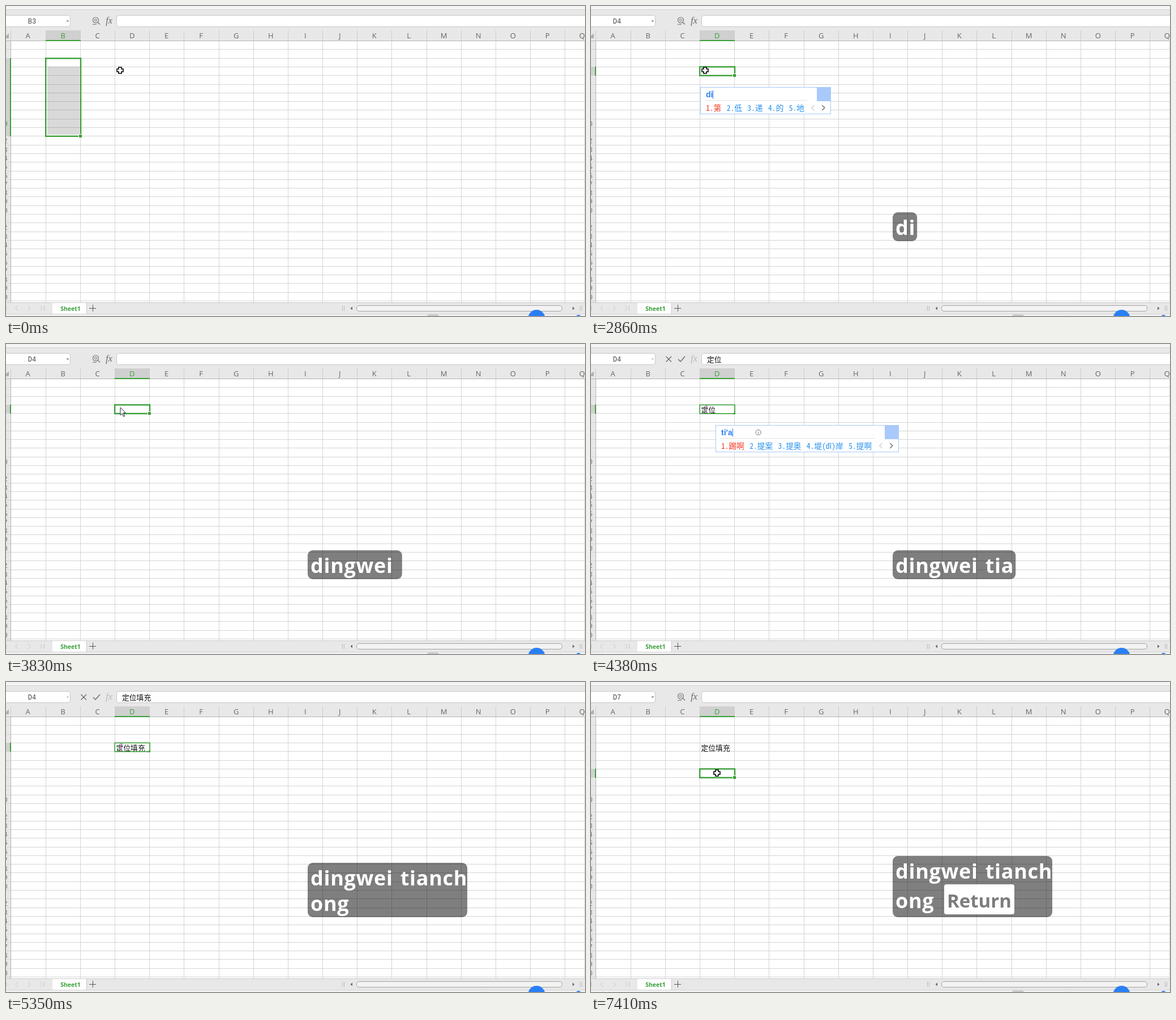
These frames come from a looping animation (1023x547 px, 8 s). An HTML page with a canvas:

```html
<!DOCTYPE html>
<html lang="zh">
<head>
<meta charset="utf-8">
<style>
html, body { margin: 0; width: 100%; height: 100%; overflow: hidden; background: #fff; }
canvas { display: block; }
</style>
</head>
<body>
<canvas id="stage" width="1023" height="547"></canvas>
<script>
const ctx = document.getElementById('stage').getContext('2d');
const LOOP = 8000, GREEN = '#3a9f38', BLUE = '#2b7ff5', PANEL = '#e8e8e8';
const UI = '"Open Sans", "Noto Sans", sans-serif';
const CJK = '"Noto Sans Mono CJK SC", "Noto Sans CJK SC", "Noto Sans CJK", sans-serif';

// [start, keystroke overlay]
const overlays = [
  [0, ''], [2860, 'di'], [3010, 'ding'], [3160, 'dingw'], [3280, 'dingwe'], [3400, 'dingwei'],
  [3830, 'dingwei '], [4230, 'dingwei ti'], [4380, 'dingwei tia'], [4530, 'dingwei tian'],
  [4650, 'dingwei tianch'], [4800, 'dingwei tianch\no'], [4920, 'dingwei tianch\nong'],
  [5600, 'dingwei tianch\nong\t']
];
// [start, pinyin, candidates, info icon x]
const dingwei = '定位 定为 订位 定 顶', tianchong = '填充 天虫 添宠 天冲 填充色';
const inputs = [
  [0], [2860, 'di', '第 低 递 的 地'], [3010, 'ding', '定 顶 订 盯 钉'],
  [3160, "ding'w", dingwei, 296], [3280, "ding'we", dingwei, 296], [3400, "ding'wei", dingwei, 296],
  [3550, "ding'wei", dingwei, 358], [3830],
  [4230, 'ti', '题 提 体 替 踢'], [4380, "ti'a", '踢啊 提案 提奥 堤(dī)岸 提啊', 295.5],
  [4530, 'tian', '天 填 田 添 甜'], [4650, "tian'ch", tianchong, 334],
  [4800, "tian'cho", tianchong, 343], [4920, "tian'chong", tianchong, 365],
  [5070, "tian'chong", tianchong, 446], [5350]
];
// [start, column, first row, last row]
const selections = [[0, 1, 2, 10], [420, 3, 3, 3], [5600, 3, 4, 4], [7410, 3, 6, 6]];
// [start, shape, x, y]
const pointers = [
  [0, 'cross', 201.5, 113.5], [3830, 'arrow', 202, 112], [3950, 'beam', 204, 115],
  [5750, 'cross', 201.5, 113.5], [6550, 'cross', 218.5, 106.5], [6830, 'cross', 219.5, 137.5],
  [6980, 'cross', 222.5, 147.5], [7130, 'cross', 222.5, 160.5]
];
const names = [[0, 'B3'], [420, 'D4'], [5750, 'D5'], [7410, 'D7']];

const current = (list, t) => list.filter(item => item[0] <= t).pop();
const colX = i => Math.floor(8.94 + 61.18 * i);
const rowY = i => Math.floor(61.58 + 15.3 * i);

function rect(x, y, w, h, color) {
  ctx.fillStyle = color;
  ctx.fillRect(x, y, w, h);
}
function rounded(x, y, w, h, r, fill, stroke) {
  ctx.beginPath();
  ctx.roundRect(x, y, w, h, r);
  paint(fill, stroke);
}
function paint(fill, stroke, width = 1) {
  ctx.lineWidth = width;
  if (fill) { ctx.fillStyle = fill; ctx.fill(); }
  if (stroke) { ctx.strokeStyle = stroke; ctx.stroke(); }
}
function poly(points, stroke, width = 1, fill) {
  ctx.beginPath();
  for (let i = 0; i < points.length; i += 2) ctx.lineTo(points[i], points[i + 1]);
  if (fill) ctx.closePath();
  paint(fill, stroke, width);
}
function circle(x, y, r, fill, stroke, width) {
  ctx.beginPath();
  ctx.arc(x, y, r, 0, 7);
  paint(fill, stroke, width);
}
function text(str, x, y, font, color, align = 'left') {
  ctx.font = font;
  ctx.fillStyle = color;
  ctx.textAlign = align;
  ctx.fillText(str, x, y);
  return ctx.measureText(str).width;
}
const chevron = (x, y, dir, size, color, width) =>
  poly([x - dir * size / 2, y - size, x + dir * size / 2, y, x - dir * size / 2, y + size], color, width);

function drawToolbar(t, editing) {
  rect(0, 0, 1023, 62, PANEL);
  rect(0, 0, 1023, 6, '#f4f4f4');
  rect(0, 6, 1023, 1, '#d2d2d2');
  rounded(-8, 16.5, 121.5, 20, 4, '#fff', '#c6c6c6');
  rounded(195.5, 16.5, 840, 20, 4, '#fff', '#c6c6c6');
  text(current(names, t)[1], 46, 31, '12px "Liberation Mono", monospace', '#444', 'center');
  poly([106.5, 25.5, 111.5, 25.5, 109, 28.5], null, 1, editing ? '#c4c4c4' : '#888');
  if (editing) {
    poly([132.5, 22, 142, 31.5], '#666', 1.3);
    poly([142, 22, 132.5, 31.5], '#666', 1.3);
    poly([154, 27, 158, 31, 166, 22], '#666', 1.4);
    text('定位' + (t >= 5350 ? '填充' : ''), 205, 31.5, '300 12.8px ' + CJK, '#111');
  } else {
    circle(158.5, 25, 5, null, '#777', 1.2);
    circle(158.5, 25, 2, null, '#777', 1);
    poly([162, 28.5, 166, 32.5], '#777', 1.5);
    poly([153, 32.5, 160, 32.5], '#777', 1);
  }
  text('fx', 182, 31, 'italic 16px "Liberation Serif", serif', editing ? '#b8b8b8' : '#666', 'center');
}

function drawSheet([, col, first, last]) {
  const left = colX(col), right = colX(col + 1), top = rowY(first), bottom = rowY(last + 1);
  rect(0, 62, 9, 462, PANEL);
  rect(left, 43, right - left, 19, '#d0d0d0');
  rect(0, top, 9, bottom - top, '#d0d0d0');
  if (last > first) rect(left + 3, rowY(first + 1), right - left - 4, bottom - rowY(first + 1) - 2, '#d9d9d9');
  for (let i = 1; i <= 30; i++) rect(0, rowY(i), 1023, 1, '#d4d4d4');
  for (let i = 0; i < 17; i++) {
    rect(colX(i), 62, 1, 462, '#d4d4d4');
    rect(colX(i), 43, 1, 18, '#cdcdcd');
    text(String.fromCharCode(65 + i), colX(i) + 30.7, 57, '13px ' + UI, i === col ? GREEN : '#666', 'center');
  }
  rect(1022, 62, 1, 462, '#d4d4d4');
  for (let i = first + 1; i <= last; i++) rect(left + 3, rowY(i), right - left - 4, 1, '#bababa');
  for (let i = 0; i < 30; i++) {
    text(i + 1, -4.7, rowY(i) + 12.5, '13px ' + UI, i >= first && i <= last ? GREEN : '#777', 'center');
  }
  rect(0, 61, 1023, 1, '#b4b4b4');
  rect(8, 62, 1, 462, '#b4b4b4');
  poly([5, 48, 5, 57, -4, 57], null, 1, '#b0b0b0');
  rect(left, 60, right - left + 1, 2, GREEN);
  rect(7, top, 2, bottom - top + 1, GREEN);
}

function drawSelection([, col, first, last], editing) {
  const x = colX(col), y = rowY(first), w = colX(col + 1) - x, h = rowY(last + 1) - y;
  ctx.lineWidth = editing ? 1.6 : 2.4;
  ctx.strokeStyle = GREEN;
  ctx.strokeRect(x + .2, y + .4, w + .8, h + .4);
  if (editing) {
    poly([x + w + 2, y + h - 3, x + w + 2, y + h + 2, x + w - 3, y + h + 2], null, 1, GREEN);
  } else {
    rect(x + w - 3, y + h - 3, 6, 6, '#fff');
    rect(x + w - 2, y + h - 2, 5, 5, GREEN);
  }
}

function drawFooter(editing) {
  rect(0, 523, 1023, 24, PANEL);
  rect(0, 523, 1023, 1, '#c8c8c8');
  rect(0, 543, 1023, 1, '#d2d2d2');
  rect(0, 544, 1023, 3, '#f2f2f2');
  rect(82, 524, 60, 19, '#fff');
  rect(142, 524, 1, 19, '#c8c8c8');
  text('Sheet1', 114, 538, 'bold 10.5px ' + UI, GREEN, 'center');
  rect(0, 529, 1, 9, '#c4c4c4');
  chevron(19, 533.5, -1, 4.5, '#c4c4c4');
  chevron(41, 533.5, 1, 4.5, '#c4c4c4');
  chevron(62, 533.5, 1, 4.5, '#c4c4c4');
  rect(67, 529, 1, 9, '#c4c4c4');
  rect(147, 533, 12, 1, '#555');
  rect(153, 527, 1, 12, '#555');
  for (const x of [594, 597, 1014, 1017]) rect(x, 529, 1, 9, '#bbb');
  rounded(619.5, 528.5, 363, 10, 4.5, '#f3f3f3', '#a2a2a2');
  poly([612, 530.5, 612, 536.5, 608.5, 533.5], null, 1, '#666');
  poly([1001, 530.5, 1001, 536.5, 1004.5, 533.5], null, 1, '#666');
  if (!editing) rounded(744, 544.5, 21, 8, 3, '#c6c6c6');
  rect(20, 546, 1, 1, '#bbb');
  rect(844, 546, 1, 1, '#bbb');
  circle(937.5, 551, 15, BLUE);
  circle(1011.5, 550, 5, BLUE);
}

function drawInput([, pinyin, words, iconX], t) {
  if (!pinyin) return;
  const x = t < 3830 ? 193 : 220;
  const labels = words.split(' ').map((word, i) => `${i + 1}.${word}`);
  const font = '300 13.6px ' + CJK;
  ctx.font = font;
  const end = labels.reduce((sum, label) => sum + ctx.measureText(label).width + 9.5, x + 10) - 9.5;
  const right = Math.round(end + 47.5);
  ctx.lineWidth = 1;
  rect(x, 143, right - x, 48, '#fff');
  ctx.strokeStyle = '#a9caf8';
  ctx.strokeRect(x + .5, 143.5, right - x - 1, 47);
  rect(right - 25, 143, 25, 25, '#a9c9fa');
  rect(x + 9, 166, right - x - 51, 1, '#e2e2e2');
  const width = text(pinyin, x + 10, 161, 'bold 14px "Liberation Sans", sans-serif', BLUE);
  rect(Math.round(x + 10 + width), 149, 1, 15, BLUE);
  if (iconX) {
    circle(iconX, 156, 4.6, null, '#777', 1);
    rect(iconX - .5, 153, 1, 1, '#777');
    rect(iconX - .5, 155, 1, 4, '#777');
  }
  let pos = x + 10;
  labels.forEach((label, i) => {
    pos += text(label, pos, 184.5, font, i ? '#2590ec' : '#f23a25') + 9.5;
  });
  chevron(right - 32, 179.5, -1, 4.5, '#ccc', 1.3);
  chevron(right - 13.5, 179.5, 1, 4.5, '#777', 1.6);
}

function drawOverlay(str) {
  if (!str) return;
  const [line, rest] = str.replace('\t', '').split('\n');
  const hasReturn = str.endsWith('\t'), font = 'bold 36px ' + UI;
  ctx.save();
  ctx.letterSpacing = '0.7px';
  ctx.wordSpacing = '3px';
  ctx.font = font;
  const width = rest ? 282 : Math.min(282, ctx.measureText(line).width + 8);
  const top = hasReturn ? 307 : rest ? 319 : 364;
  rounded(533, top, width, 415 - top, 9, 'rgba(0,0,0,.5)');
  text(line, 538, top + 40, font, '#fff');
  if (rest) text(rest, 538, hasReturn ? 399 : 404, font, '#fff');
  ctx.restore();
  if (hasReturn) {
    rounded(624, 357, 124, 53, 4, '#fff');
    text('Return', 686, 398, 'bold 33px ' + UI, '#7c7c7c', 'center');
  }
}

function drawPointer([, shape, x, y]) {
  ctx.save();
  ctx.translate(x, y);
  if (shape === 'cross') {
    const a = 2.5, b = 5.5;
    poly([-a, -b, a, -b, a, -a, b, -a, b, a, a, a, a, b, -a, b, -a, a, -b, a, -b, -a, -a, -a], '#000', 1.6, '#fff');
  } else if (shape === 'arrow') {
    poly([0, 0, 0, 13.5, 3.2, 10.6, 5.6, 16, 7.6, 15.1, 5.3, 9.9, 9.3, 9.5], '#223', 1, '#fff');
  } else {
    rect(-.5, -5, 1, 11, '#8a4a86');
    rect(-2.5, -6, 5, 1, '#8a4a86');
    rect(-2.5, 6, 5, 1, '#8a4a86');
  }
  ctx.restore();
}

function draw(now) {
  const t = now % LOOP, selection = current(selections, t);
  const editing = t >= 3950 && t < 5600, barEditing = t >= 3950 && t < 5750;
  rect(0, 0, 1023, 547, '#fff');
  drawToolbar(t, barEditing);
  drawSheet(selection);
  if (t >= 3950) {
    if (editing) rect(193, 108, 60, 14, '#fff');
    text('定位' + (t >= 5350 ? '填充' : ''), 194.5, 120.5, '300 12.8px ' + CJK, '#111');
  }
  drawSelection(selection, editing);
  if (editing && (t < 4380 || t >= 4920 && t < 5350)) rect(220, 108, 1, 14, '#000');
  drawFooter(barEditing);
  drawInput(current(inputs, t), t);
  drawOverlay(current(overlays, t)[1]);
  drawPointer(current(pointers, t));
}

const start = performance.now();
function tick() {
  draw(performance.now() - start);
  requestAnimationFrame(tick);
}
tick();
</script>
</body>
</html>
```
